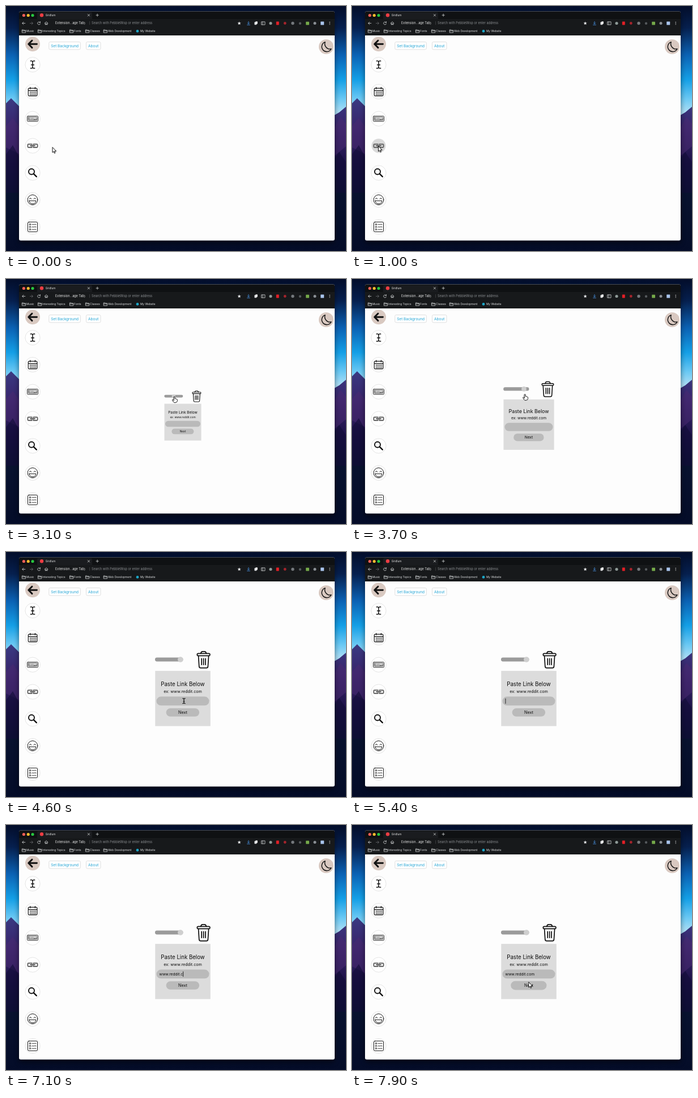
Animation, 600 px wide and 433 px high, one loop 8 s. Source, as an HTML page:

```html
<!DOCTYPE html>
<html lang="en">
<head>
<meta charset="utf-8">
<title>New tab widgets</title>
<style>
  html, body { margin: 0; width: 100%; height: 100%; overflow: hidden; background: #050d2a; }
  svg { display: block; width: 100vw; height: 100vh; font-family: Inter, "Open Sans", sans-serif; }
  .line { fill: none; stroke: #111; stroke-linecap: round; stroke-linejoin: round; }
  .light { fill: none; stroke: #d5d7d9; stroke-width: .8; stroke-linecap: round; stroke-linejoin: round; }
  .mid { text-anchor: middle; }
</style>
</head>
<body>
<svg viewBox="0 0 600 433" preserveAspectRatio="none">
  <defs>
    <linearGradient id="sky" x2="0" y2="1">
      <stop offset="0" stop-color="#030d2a"/>
      <stop offset=".09" stop-color="#06204f"/>
      <stop offset=".2" stop-color="#0b62b4"/>
      <stop offset=".3" stop-color="#149fe6"/>
      <stop offset=".38" stop-color="#6cc9f4"/>
      <stop offset=".43" stop-color="#a9ddf5"/>
    </linearGradient>
    <linearGradient id="hill" x2="0" y2="1">
      <stop offset="0" stop-color="#3a3a82"/>
      <stop offset=".2" stop-color="#38246b"/>
      <stop offset=".42" stop-color="#1d1248"/>
      <stop offset=".62" stop-color="#08122f"/>
      <stop offset="1" stop-color="#040c28"/>
    </linearGradient>
    <filter id="blur" x="-10%" y="-10%" width="120%" height="120%"><feGaussianBlur stdDeviation="5"/></filter>
    <clipPath id="win"><rect x="23" y="9.5" width="557" height="405" rx="3"/></clipPath>
  </defs>

  <rect width="600" height="433" fill="url(#sky)"/>
  <path d="M0 172L9 163L24 178V195H576L588 188L600 178V433H0Z" fill="url(#hill)"/>
  <path d="M0 212L12 198L24 214V262L0 250ZM576 222L590 196L600 208V248L576 268Z" fill="#4a2a72" opacity=".55"/>
  <path d="M0 262L12 246L24 268V330H0ZM576 275L588 258L600 276V330H576Z" fill="#120d38" opacity=".6"/>
  <rect x="23" y="14" width="557" height="405" rx="4" fill="#000" opacity=".5" filter="url(#blur)"/>

  <g clip-path="url(#win)">
    <rect x="23" y="9" width="557" height="406" fill="#fdfdfd"/>
    <rect x="23" y="9" width="557" height="14" fill="#0f1113"/>
    <path d="M55 23V13q0-2 2-2H150q2 0 2 2V23Z" fill="#1a1c1f"/>
    <rect x="23" y="23" width="557" height="29" fill="#17191b"/>
  </g>
  <g id="chrome"></g>

  <g id="page">
    <g fill="#fff" stroke="#dcdcdc" stroke-width=".9">
      <rect x="75.8" y="63.5" width="55.5" height="13.4" rx="2.2"/>
      <rect x="141.5" y="63.5" width="25.5" height="13.4" rx="2.2"/>
    </g>
    <g class="mid" font-size="6.5" fill="#1fa3d4">
      <text x="103.6" y="72.6">Set Background</text><text x="154.2" y="72.6">About</text>
    </g>
    <g fill="#d9c9c1"><circle cx="47" cy="67.3" r="13"/><circle cx="565" cy="72" r="13"/></g>
    <path class="line" stroke-width="2.9" d="M54.5 67.3H40M46 61L39.7 67.3L46 73.6"/>
    <path class="line" stroke-width="1.4" d="M563.2 63.6A8.8 8.8 0 1 0 574 75.8A9.2 9.2 0 0 1 563.2 63.6Z"/>
    <g id="rings"></g>
    <path class="line" stroke-width="1.5" d="M43.3 97.2q3.7-.6 3.7 2q0-2.6 3.7-2M47 99V108M43.3 110q3.7.6 3.7-2q0 2.6 3.7 2M44.6 104H49.4"/>
    <g class="line" stroke-width="1.2">
      <rect x="39.3" y="145.3" width="15.6" height="13.6" rx="1.5"/>
      <path d="M39.5 149.3H54.7M42.8 143.5V146.5M51.4 143.5V146.5"/>
      <path d="M42 152H53M42 154.4H53M42 156.7H53" stroke-width="1.4" stroke-dasharray="1.4 1" stroke-linecap="butt"/>
    </g>
    <g class="line" stroke-width=".9">
      <rect x="37.5" y="194.6" width="19" height="9.3" rx="1.2"/>
      <rect x="39.4" y="196.5" width="15.2" height="5.5" rx=".4" stroke-width=".7"/>
    </g>
    <text class="mid" x="47" y="200.6" font-size="3.2" font-weight="700">12:00 pm</text>
    <g class="line" style="stroke:#666" stroke-width="2">
      <path d="M45.6 245V244.2H39.8Q38.4 244.2 38.4 245.6V248.6Q38.4 250 39.8 250H45.6V249M48.4 245V244.2H54.2Q55.6 244.2 55.6 245.6V248.6Q55.6 250 54.2 250H48.4V249M43 247.1H51"/>
    </g>
    <g class="line" stroke-width="1.9"><circle cx="45" cy="292.8" r="5"/><path d="M48.8 296.6L53.8 301.6" stroke-width="2.4"/></g>
    <g class="line" stroke-width="1">
      <circle cx="47" cy="342.6" r="8.9"/>
      <path d="M41.2 341q1.8-2.8 3.8 0M49 341q1.8-2.8 3.8 0M41 344.2H53Q52.3 349.7 47 349.7T41 344.2Z"/>
    </g>
    <g class="line" stroke-width="1"><rect x="38.4" y="381.8" width="17.2" height="17.2" rx="2.2"/><g id="rows" stroke-width=".9"></g></g>
  </g>

  <g id="widget">
    <rect id="panel" x="279.5" y="220.5" width="65" height="65" fill="#dcdcdc"/>
    <rect id="field" x="281" y="250.8" width="62" height="10.5" rx="5.25" fill="#bababa"/>
    <g id="next"><rect x="292.4" y="264.6" width="39" height="9.7" rx="4.85" fill="#bababa"/></g>
    <g class="mid" fill="#0b0b0b">
      <text x="312" y="238.3" font-size="6.45">Paste Link Below</text>
      <text x="312" y="246.4" font-size="4.8">ex: www.reddit.com</text>
      <text x="312" y="271.1" font-size="4.8">Next</text>
    </g>
    <text id="typed" x="284.3" y="257.6" font-size="4.45" fill="#0b0b0b"></text>
    <path id="caret" d="M0 253V259.2" stroke="#111" stroke-width=".6"/>
    <g id="controls">
      <rect x="279.3" y="204.8" width="33" height="4.6" rx="2.3" fill="#9b9b9b"/>
      <circle id="thumb" cy="207.1" r="3.2" fill="#cfcfcf"/>
      <g class="line" stroke-width="1.15">
        <rect x="328.9" y="200" width="15" height="2.6" rx="1.2"/>
        <path d="M333.2 200Q333.4 197.7 335.4 197.7H337.4Q339.4 197.7 339.6 200M330.4 202.8L331.2 215.3Q331.4 217 333 217H339.8Q341.4 217 341.6 215.3L342.4 202.8M334.1 206V213.2M336.4 206V213.2M338.7 206V213.2"/>
      </g>
    </g>
  </g>

  <g id="cursor" stroke-linejoin="round" stroke-linecap="round">
    <path id="arrow" d="M0 0V9L2.1 7.1L3.5 10.3L5 9.6L3.6 6.5H6.3Z" fill="#fff" stroke="#111" stroke-width="1"/>
    <path id="beam" d="M-2.2-4.4Q0-4.6 0-3Q0-4.6 2.2-4.4M0-3V3M-2.2 4.4Q0 4.6 0 3Q0 4.6 2.2 4.4M-1 .8H1" fill="none" stroke="#111" stroke-width="1.2"/>
    <path id="hand" d="M-1-4.2Q0-5.4 1-4.2V-1Q2-1.6 2.7-.6Q3.7-1 4.1 0Q5.3-.3 5.3 1V3Q5.3 6-.2 6Q-1.3 5.4-3.4 1.8Q-3.9.5-2.7.5L-1 2Z" fill="#fff" stroke="#111" stroke-width="1"/>
  </g>
</svg>
<script>
const LOOP = 8000;
const $ = id => document.getElementById(id);
const NS = "http://www.w3.org/2000/svg";

function add(parent, tag, attrs, text) {
  const el = document.createElementNS(NS, tag);
  for (const key in attrs) el.setAttribute(key, attrs[key]);
  if (text) el.textContent = text;
  parent.appendChild(el);
  return el;
}

function buildChrome() {
  const bar = $("chrome");
  const label = (x, y, size, fill, text) => add(bar, "text", { x, y, "font-size": size, fill }, text);
  const dot = (cx, cy, r, fill) => add(bar, "circle", { cx, cy, r, fill });
  const box = (x, y, width, height, fill) => add(bar, "rect", { x, y, width, height, rx: .7, fill });
  const icon = d => add(bar, "path", { d, class: "light" });

  ["#fd5f57", "#febc2e", "#28c840"].forEach((fill, i) => dot(31.4 + i * 7.8, 16.5, 2.6, fill));
  dot(63, 16.3, 3.2, "#ee3d43");
  label(69.7, 18.1, 4.8, "#e8e8e8", "Gridlum");
  icon("M144.2 14.6l3.4 3.4M147.6 14.6l-3.4 3.4M159 16.2h4.4M161.2 14v4.4");

  icon("M33.8 30.5h-5M31 28.2l-2.3 2.3l2.3 2.3");
  icon("M42.4 30.5h5M45.2 28.2l2.3 2.3l-2.3 2.3").style.stroke = "#66696c";
  icon("M60.2 29A2.5 2.5 0 1 0 60.5 31.5M60.5 27.6V29.3H58.8");
  icon("M68.2 30.5l2.9-2.6l2.9 2.6M69.2 30v3h1.2v-1.6h1.4v1.6h1.2v-3");
  label(87, 32.4, 5.5, "#ececec", "Extension...age Tab)");
  label(147, 32.2, 5.2, "#77797c", "|");
  label(151, 32.4, 5.5, "#8b8e91", "Search with PebbleWisp or enter address");

  add(bar, "path", { d: "M411.6 27.4l.9 2.1l2.2.1l-1.7 1.4l.6 2.2l-2-1.2l-2 1.2l.6-2.2l-1.7-1.4l2.2-.1Z", fill: "#e3e5e7" });
  icon("M428 27.4v4M426.3 30l1.7 1.7l1.7-1.7M425.6 33.4h4.8").style.stroke = "#4d9df5";
  box(438.4, 28.3, 4, 5, "#d9dbdd");
  box(440.3, 27.3, 3.6, 4.4, "#f0f0f0");
  icon("M451 27.9h6v5.2h-6ZM453 28v5");
  dot(467, 30.5, 2.6, "#8e9a97");
  box(476.8, 27.4, 5, 6, "#e21f26");
  dot(492.3, 30.5, 2.4, "#a5242c");
  dot(506, 30.5, 2.7, "#75797d");
  dot(519, 30.8, 2.2, "#565a5d");
  box(529.2, 27.7, 5.8, 5.8, "#75a94a");
  dot(545, 30.5, 2.5, "#8b9095");
  box(555.2, 27.6, 6, 6, "#a9c4ec");
  [28.4, 30.5, 32.6].forEach(y => dot(571.2, y, .65, "#dedede"));

  [[28.7, "Music"], [56.8, "Interesting Topics"], [112.8, "Fonts"], [140.8, "Classes"], [172.6, "Web Development"]]
    .forEach(([x, name]) => {
      icon(`M${x} 42h2.1l.7.9h3.1v4.1h-5.9ZM${x} 43.8h5.8`);
      label(x + 7.3, 46.2, 4.8, "#dfe1e3", name);
    });
  dot(232, 44.4, 2.4, "#1ca7c8");
  label(237, 46.2, 4.8, "#dfe1e3", "My Website");
}

function buildPage() {
  for (let i = 0; i < 7; i++) {
    add($("rings"), "circle", { cx: 47, cy: 103.6 + i * 47.82, r: 13.1, fill: "#fff", stroke: "#dedede", "stroke-width": .8 });
  }
  for (let y = 386; y < 397; y += 4.4) {
    add($("rows"), "circle", { cx: 42.4, cy: y, r: 1.2 });
    add($("rows"), "path", { d: `M45.8 ${y + .5}l1.6-.7l1.6.7l1.5-.7l2.6.4` });
  }
}

const clamp = v => Math.max(0, Math.min(1, v));
const ease = v => v * v * (3 - 2 * v);
const ramp = (t, from, to) => ease(clamp((t - from) / (to - from)));
const show = (el, on) => el.setAttribute("visibility", on ? "visible" : "hidden");

// time, x, y
const route = [
  [150, 82, 250], [850, 46.5, 248], [1200, 46.5, 248], [1800, 292, 256.3], [2050, 292, 256.3],
  [2850, 297, 212.5], [3200, 297, 212.5], [3950, 308, 207], [4100, 308, 207],
  [4500, 314, 263.2], [7300, 314, 263.2], [7750, 311.8, 278]
];

function cursorAt(t) {
  const i = route.findIndex(stop => stop[0] > t);
  if (i === 0) return route[0].slice(1);
  if (i < 0) return route[route.length - 1].slice(1);
  const [a, b] = [route[i - 1], route[i]], k = ramp(t, a[0], b[0]);
  return [a[1] + (b[1] - a[1]) * k, a[2] + (b[2] - a[2]) * k];
}

function cursorKind(t, y) {
  if (t >= 5250 && t < 7320) return "none";
  if (t > 2600 && t < 4180) return "hand";
  const overField = (t > 1720 && t < 2600 && y > 250) || (t > 4180 && y > 256 && y < 271);
  return overField ? "beam" : "arrow";
}

const ADDRESS = "www.reddit.com";
const linkRing = () => $("rings").children[3];

function draw(t) {
  const [x, y] = cursorAt(t), kind = cursorKind(t, y);
  $("cursor").setAttribute("transform", `translate(${x} ${y})`);
  for (const name of ["arrow", "beam", "hand"]) show($(name), kind === name);

  const overLink = t > 550 && t < 1330;
  linkRing().setAttribute("fill", overLink ? "#d9d9d9" : "#fff");
  linkRing().setAttribute("stroke", overLink ? "none" : "#dedede");
  linkRing().setAttribute("r", overLink ? 12.5 : 13.1);

  const resize = ramp(t, 3200, 3950), scale = 1 + .5 * resize;
  $("widget").style.display = t >= 1200 ? "" : "none";
  $("widget").setAttribute("transform", `translate(312 241.25) scale(${scale}) translate(-312 -241.25)`);
  const hover = clamp((t - 1860) / 450);
  $("controls").setAttribute("opacity", hover);
  for (const id of ["panel", "field", "next"]) $(id).setAttribute("opacity", .85 + .15 * hover);
  $("thumb").setAttribute("cx", 295.8 + 13.4 * resize);

  const grow = 1 + .08 * ramp(t, 7560, 7760);
  $("next").setAttribute("transform", `translate(312 269.4) scale(${grow}) translate(-312 -269.4)`);

  const count = Math.floor(clamp((t - 5320) / (140 * ADDRESS.length)) * ADDRESS.length + 1e-6);
  const typed = $("typed");
  typed.textContent = ADDRESS.slice(0, count);
  const caretX = 284.6 + (count ? typed.getComputedTextLength() : 0);
  $("caret").setAttribute("transform", `translate(${caretX} 0)`);
  show($("caret"), t >= 4800 && t < 7700 && (t > 5320 || t < 5250));
}

buildChrome();
buildPage();
const start = performance.now();
function tick() {
  draw((performance.now() - start) % LOOP);
  requestAnimationFrame(tick);
}
tick();
</script>
</body>
</html>
```
